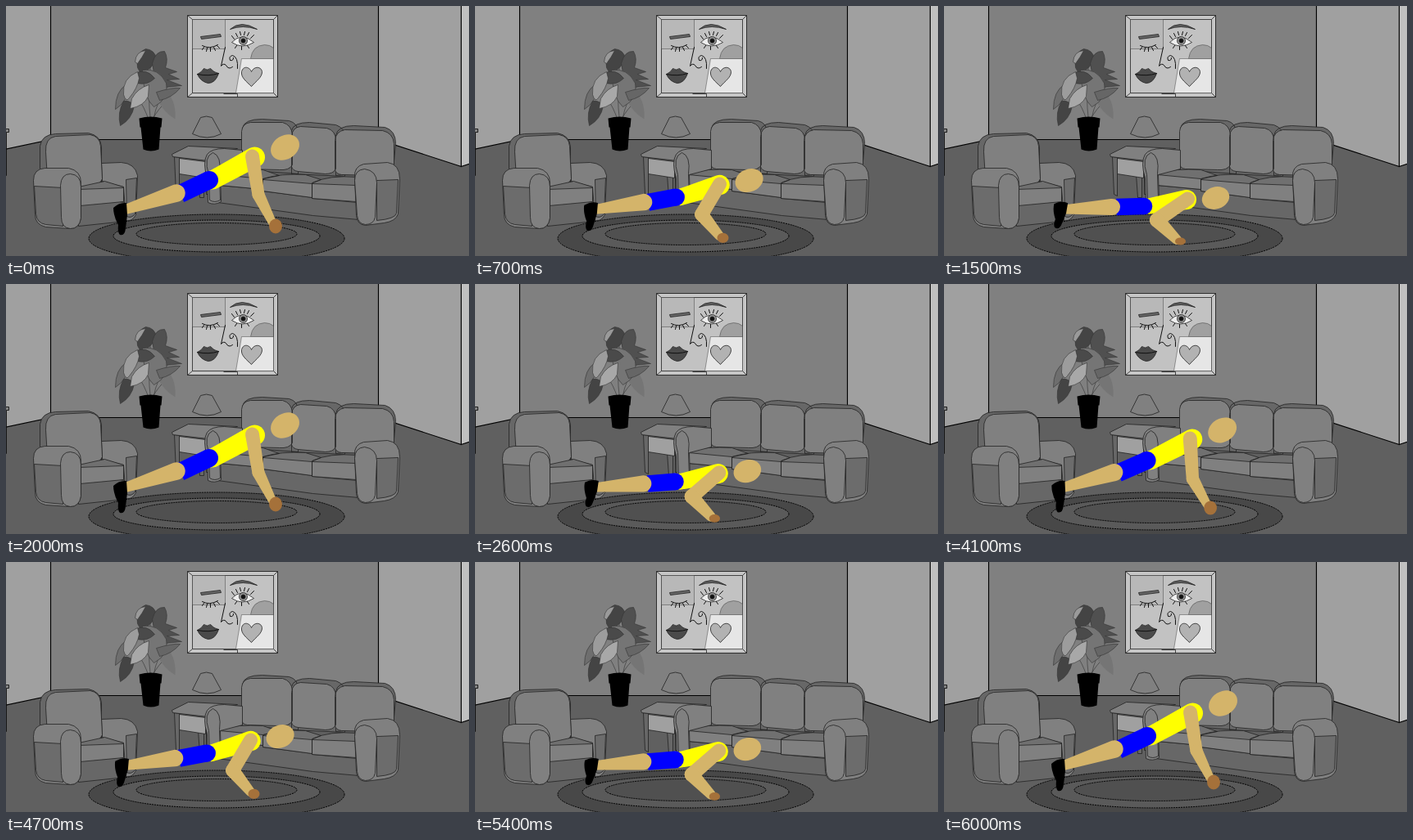
An HTML page for the animation above (6.1 s loop, 565 px wide and 306 px high).

```html
<!DOCTYPE html>
<html lang="en">
<head>
<meta charset="utf-8">
<title>Push-ups</title>
<style>
html, body { margin: 0; width: 100%; height: 100%; overflow: hidden; background: #606060; }
svg { display: block; }
.room { stroke: #000; stroke-width: 1.1; }
.soft { stroke: #222; stroke-width: .8; fill: #808080; }
.dark { fill: #676767; }
.seat { fill: #707070; }
.panel { fill: #6c6c6c; }
.drawer { fill: #a0a0a0; }
.ink { fill: none; stroke: #111; stroke-width: 1; stroke-linecap: round; }
</style>
</head>
<body>
<svg width="565" height="306" viewBox="0 0 565 306">
<g transform="translate(.5 .5)">
  <g class="room">
    <path fill="#808080" d="M54-2H454V163H54Z"/>
    <path fill="#a0a0a0" d="M-2-2H54V163L-2 175Z"/>
    <path fill="#a0a0a0" d="M454-2H555V196L454 163Z"/>
    <path fill="#c0c0c0" d="M555-2H567V192L555 196Z"/>
    <path fill="#808080" d="M-2 150H3V154H0V207H-2Z" stroke-width=".8"/>
  </g>

  <!-- wall picture -->
  <g stroke="#222" stroke-width=".8">
    <path fill="#c6c6c6" stroke="#111" d="M221 11H331V111H221Z"/>
    <path fill="#c2c2c2" d="M227 16H326V106H227ZM221 11L227 16M331 11L326 16M221 111L227 106M331 111L326 106"/>
    <path fill="#b8b8b8" stroke-width=".4" d="M227 16H267V52H227Z"/>
    <path fill="#a0a0a0" stroke-width=".4" d="M298 64Q300 48 315 47Q322 47 326 51V64Z"/>
    <path fill="#e6e6e6" stroke-width=".4" d="M287 64H326V106H280Z"/>
    <path fill="none" d="M265 107H282V111"/>
    <path fill="#b2b2b2" d="M299 98C293 92 286 87 287 80C289 72 297 74 299 80C302 73 311 73 312 80C312 87 305 91 299 98Z"/>
    <path fill="#4a4a4a" d="M233 83Q238 81 241 76Q245 79 249 76Q253 81 259 82Q255 94 246 94Q237 92 233 83Z"/>
    <path fill="#606060" d="M273 28Q286 16 306 28Q288 22 273 28Z"/>
    <path fill="#666" d="M237 37L261 34L262 37L238 40Z"/>
    <path fill="#eee" d="M275 44Q287 31 302 44Q288 53 275 44Z"/>
    <circle cx="289" cy="42" r="5" fill="#999"/>
    <circle cx="289" cy="42" r="2.6" fill="#111"/>
  </g>
  <path class="ink" d="M267 50L262 73Q265 69 268 72Q271 78 276 74M282 76Q283 62 276 60Q271 61 273 66Q277 67 277 63M233 83Q247 86 259 82"/>
  <path class="ink" d="M239 48Q248 53 258 47M241 50L239 53M245 51L244 55M249 51V55M253 50L255 54M257 48L260 51M278 40L275 36M282 37L280 33M286 35L285 31M290 35L291 31M294 36L296 32M298 39L302 35M281 48L279 51M287 49V53M294 48L296 51"/>

  <!-- plant -->
  <g stroke="#333" stroke-width=".6">
    <path fill="none" stroke="#333" d="M176 140Q172 110 176 70M174 140Q168 122 160 112M179 140Q184 112 200 94M177 140Q186 124 196 116"/>
    <path fill="#757575" d="M189 98Q208 112 206 138Q191 129 184 113Z" stroke="none"/>
    <path fill="#444" d="M160 75Q157 57 170 52Q181 53 183 64Q178 77 164 82Z"/>
    <path fill="#9a9a9a" d="M157 68Q158 55 170 54Q166 62 160 70Z"/>
    <path fill="#505050" d="M178 70Q182 54 193 55Q198 64 194 75L208 80L198 83L211 89L196 90L214 97L194 99Q180 91 178 70Z"/>
    <path fill="#757575" d="M166 78Q186 75 195 94Q199 113 180 123Q167 112 166 78Z"/>
    <path fill="#4a4a4a" d="M157 82Q171 75 181 88Q172 97 159 94Z"/>
    <path fill="#6e6e6e" d="M146 96Q133 104 133 126Q140 122 146 112Z"/>
    <path fill="#444" d="M143 116Q135 130 139 146Q153 138 156 122Q150 114 143 116Z"/>
    <path fill="#9c9c9c" d="M160 80Q141 88 143 108Q146 118 150 112Q160 100 162 88Z"/>
    <path fill="#a8a8a8" d="M174 96Q160 100 153 113L151 125Q168 122 173 110Z"/>
    <path fill="#666" d="M183 105Q202 99 212 100Q202 112 187 115Z"/>
  </g>
  <path d="M162 137Q176 133 190 137L189 148H188L186 175Q176 179 167 175L164 148H163Z"/>

  <!-- lamp and side table -->
  <path class="soft" d="M237 136Q244 133 251 136L262 156Q245 165 227 156Z"/>
  <path class="soft dark" d="M205 184L211 185V232L207 230ZM234 206H241V234H236ZM244 187H260V230H244Z"/>
  <path class="soft drawer" d="M211 186L243 190V210L211 205Z"/>
  <path class="soft" d="M202 181L222 171L282 174L246 186V189L203 184Z"/>

  <!-- sofa -->
  <path class="soft dark" d="M260 214H430V261L374 256L258 240Z"/>
  <path class="soft dark" d="M288 200V149Q290 138 312 138L345 140Q356 143 356 155V205ZM348 205V152Q350 142 370 142L402 145Q414 149 413 162V208ZM402 207V158Q404 146 424 146L462 148Q475 152 475 168L472 200Z"/>
  <path class="soft" d="M287 192V153Q288 143 298 142L337 142Q348 145 349 157V194Q345 201 333 200L294 199Q287 198 287 192ZM348 196V159Q349 148 359 147L391 149Q402 152 402 164V199Q399 205 389 205L356 202Q349 201 348 196ZM401 200V164Q402 153 413 151L459 152Q472 155 473 168V199Q469 207 456 207L409 206Q402 205 401 200Z"/>
  <path class="soft seat" d="M260 204Q282 198 313 200L333 207L314 211V224L260 219ZM313 211Q335 204 365 206L384 212L374 216V234L313 226ZM373 216Q394 206 428 209V240L373 235Z"/>
  <path class="soft" d="M260 206L313 211V224L260 219ZM313 212L373 217V234L313 226ZM373 217L427 219V239L373 235Z"/>
  <path class="soft" d="M245 181Q250 174 266 174L288 176V199L261 206L262 239Q254 244 246 240L245 210Q239 191 245 181Z"/>
  <path class="soft" d="M247 206Q240 184 252 179Q263 183 260 205L261 237Q254 241 248 237Z"/>
  <path class="soft" d="M425 209Q424 196 436 193L465 191Q480 193 480 211L478 254Q475 263 461 265L438 268Q428 267 427 256Z"/>
  <path class="soft panel" d="M428 214L478 212L476 253Q475 260 452 262V216Z"/>
  <path class="soft" d="M425 213Q425 200 437 199Q452 201 452 216L450 258Q448 267 438 267Q429 266 428 256Z"/>

  <!-- armchair -->
  <path class="soft dark" d="M41 200V171Q43 157 60 156L100 155Q115 158 116 172V222H60Z"/>
  <path class="soft dark" d="M86 232L145 240V263L88 269Z"/>
  <path class="soft" d="M116 192L140 191Q157 192 160 207L158 255Q153 264 146 262L143 221L117 214Z"/>
  <path class="soft panel" d="M146 212L159 210L157 254Q152 260 147 257Z"/>
  <path class="soft" d="M48 178Q47 161 60 159L102 157Q114 159 115 171L117 211Q114 219 103 220L67 223Q50 221 50 211Z"/>
  <path class="soft seat" d="M88 221L120 214L143 221V238L90 243Z"/>
  <path class="soft" d="M88 224L143 222V239L90 244Z"/>
  <path class="soft" d="M33 213Q33 199 47 198L76 198Q91 201 91 216V259Q89 272 78 272L48 270Q35 267 35 255Z"/>
  <path class="soft panel" d="M34 220L69 222V269L48 267Q37 265 36 254Z"/>
  <path class="soft" d="M66 219Q67 205 78 205Q91 206 91 221V259Q89 272 78 272Q67 271 67 258Z"/>

  <!-- rug -->
  <g stroke="#000" stroke-dasharray="2 1">
    <ellipse cx="256.5" cy="284" rx="156" ry="29.5" fill="#484848"/>
    <ellipse cx="256.5" cy="281" rx="126" ry="19.5" fill="#5a5a5a"/>
    <ellipse cx="256.5" cy="278.5" rx="98" ry="13.5" fill="#505050"/>
  </g>
</g>
<g id="person"></g>
</svg>
<script>
const person = document.getElementById('person');
const SKIN = '#d4b46a', BLUE = '#00f', YELLOW = '#ff0', HAND = '#a5713a';
const STEP = 100, LOOP = 6100;

const mix = (a, b, k) => a.map((v, i) => v + (b[i] - v) * k);
const shape = (d, fill) => `<path d="${d}" fill="${fill}"/>`;
const oval = ([x, y, rx, ry, turn], fill) =>
  `<ellipse rx="${rx}" ry="${ry}" fill="${fill}" transform="translate(${x} ${y}) rotate(${turn})"/>`;

// Tapered limb: the hull of two circles given as [x, y, radius]
function limb([x1, y1, r1], [x2, y2, r2], fill) {
  const a = Math.atan2(y2 - y1, x2 - x1);
  const b = Math.acos((r1 - r2) / Math.hypot(x2 - x1, y2 - y1));
  const at = (x, y, r, t) => `${x + r * Math.cos(t)} ${y + r * Math.sin(t)}`;
  return shape(`M${at(x1, y1, r1, a + b)}A${r1} ${r1} 0 ${+(r1 > r2)} 1 ${at(x1, y1, r1, a - b)}` +
    `L${at(x2, y2, r2, a - b)}A${r2} ${r2} 0 ${+(r2 > r1)} 1 ${at(x2, y2, r2, a + b)}Z`, fill);
}

// k: 0 = arms straight, 1 = lowered
function pose(k) {
  const early = k ** 0.6;
  const bend = (a, b) => [mix(a, b, k)[0], mix(a, b, early)[1], mix(a, b, k)[2]];
  const hip = mix([252, 213, 11.5], [250, 245, 9.5], k);
  const chest = mix([303.5, 185, 12.5], [296, 237, 12], k);
  const seat = mix([248, 213, 11], [244, 245, 10.3], k);
  const hem = mix([212.5, 230], [210.5, 246], k);
  const knee = mix([208, 229, 10.7], [205, 246, 10], k);
  const ankle = mix([146, 249, 6], [147, 249, 5.5], k);
  const shoulder = mix([300.5, 184, 8.5], [297.5, 236, 8.5], k);
  const elbow = bend([308, 231, 7.5], [260, 262, 9]);
  const wrist = bend([325, 265, 5], [284, 286, 6]);
  const hand = bend([329, 269.5, 0], [288.5, 288, 0]);
  const [rx, ry, turn] = mix([8, 9, 0], [6.5, 4.5, 0], k);

  return limb(hip, chest, YELLOW) +
    `<path d="M${hem}L${seat.slice(0, 2)}" stroke="${BLUE}" stroke-width="${2 * seat[2]}"/>` +
    oval([seat[0], seat[1], seat[2], seat[2], 0], BLUE) +
    limb(knee, ankle, SKIN) +
    `<g transform="translate(141 ${262 - 5 * k}) rotate(${14 * k}) scale(1 ${1 - 0.15 * k})">` +
    shape('M-10-15Q-3-22 6-21L7-6L5 10Q4 20-2 18Q-5 15-4 6Q-10-5-10-15Z', '#000') + '</g>' +
    oval(mix([340.5, 173, 18.5, 14.5, -32], [331.5, 235, 17, 13.5, -18], k), SKIN) +
    limb(shoulder, elbow, SKIN) + limb(elbow, wrist, SKIN) +
    oval([hand[0], hand[1], rx, ry, turn], HAND);
}

function draw() {
  const step = Math.floor(performance.now() % LOOP / STEP);
  person.innerHTML = pose((1 - Math.cos(step * Math.PI / 5)) / 2);
  requestAnimationFrame(draw);
}
draw();
</script>
</body>
</html>
```
